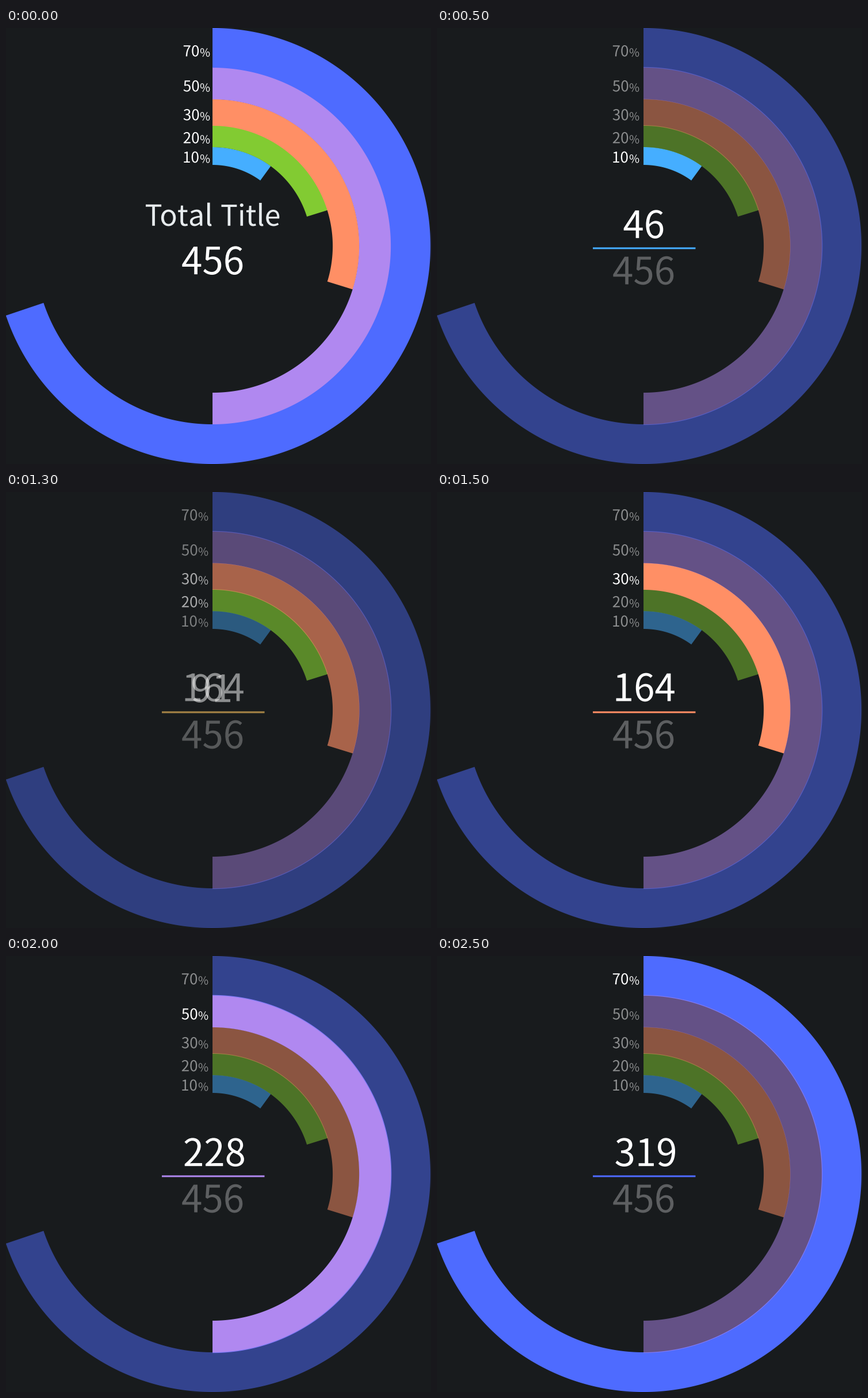
Recreate the animation shown at these times as a matplotlib script. Size 739 by 758 pixels, loop 2.7 s.

```python
import numpy as np
import matplotlib.pyplot as plt
from matplotlib.animation import FuncAnimation
from matplotlib.patches import PathPatch, Polygon, Rectangle
from matplotlib.textpath import TextPath
from matplotlib.transforms import Affine2D

W, H, DPI = 739, 758, 64
CX, CY = 359.1, 379
BG = "#181b1d"
FONT = {"family": "Noto Sans CJK JP"}
DIM = 0.5

# label, count, colour, inner radius, outer radius, sweep in degrees, label baseline
RINGS = [
    ("10", "46", "#45aeff", 141, 172, 36.1, 234),
    ("20", "91", "#82cb32", 171.8, 210, 72.7, 200.3),
    ("30", "164", "#ff8f65", 209, 255.4, 107.2, 160.3),
    ("50", "228", "#b088f0", 255, 311.2, 180, 110.3),
    ("70", "319", "#4e6bff", 310, 379, 251.4, 49.3),
]

fig = plt.figure(figsize=(W / DPI, H / DPI), dpi=DPI, facecolor=BG)
ax = fig.add_axes([0, 0, 1, 1])
ax.set_xlim(0, W)
ax.set_ylim(H, 0)
ax.axis("off")


class Scene:
    """A stack of shapes that fades as separate translucent layers."""

    def __init__(self, level):
        self.level = level
        self.parts = []

    def add(self, patch, alpha):
        patch.set_zorder(self.level * 100 + len(self.parts))
        patch.set_snap(False)
        ax.add_patch(patch)
        self.parts.append((patch, alpha))

    def text(self, s, size, x, y, align="center", color="white", alpha=1.0):
        path = TextPath((0, 0), s, size=size, prop=FONT)
        box = path.get_extents()
        anchor = {"left": box.x0, "right": box.x1,
                  "center": (box.x0 + box.x1) / 2}[align]
        place = Affine2D().translate(-anchor, 0).scale(1, -1).translate(x, y)
        self.add(PathPatch(path.transformed(place), fc=color, lw=0), alpha)

    def ring(self, color, inner, outer, sweep, alpha):
        a = np.radians(np.linspace(0, sweep, 400))
        arc = np.column_stack([np.sin(a), -np.cos(a)])
        points = np.vstack([outer * arc, inner * arc[::-1]]) + (CX, CY)
        self.add(Polygon(points, closed=True, fc=color, lw=0), alpha)

    def chart(self, active=None, shift=0):
        order = list(range(len(RINGS)))
        if active == order[-1]:
            order.insert(0, order.pop())
        for i in order:
            label, _, color, inner, outer, sweep, base = RINGS[i]
            alpha = 1 if active in (None, i) else DIM
            self.ring(color, inner, outer, sweep, alpha)
            self.text(label, 26, 322 + shift, base, alpha=alpha)
            self.text("%", 19.5, 354.3 + shift, base + 0.4, "right", alpha=alpha)

    def show(self, opacity):
        for patch, alpha in self.parts:
            patch.set_visible(opacity > 0)
            patch.set_alpha(alpha * opacity)


def overview():
    scene = Scene(0)
    scene.chart()
    title = "#e7ecee"
    scene.text("T", 50.5, 243, 343.8, "left", title)
    scene.text("otal", 50.5, 357.5, 343.8, "right", title)
    scene.text("Title", 50, 475.3, 343.8, "right", title)
    scene.text("456", 65.5, 358.8, 428.2)
    return scene


def detail(active):
    scene = Scene(active + 1)
    scene.chart(active, shift=-3)
    count, color = RINGS[active][1:3]
    x = {"46": 359, "91": 357.2}.get(count, 362.2)
    y = 363.5 if count == "164" else 365.2
    scene.text(count, 65.5, x, y)
    scene.add(Rectangle((271, 381.4), 178.5, 3, fc=color, lw=0), 1)
    scene.text("456", 65.5, 358.8, 445.6, alpha=0.3)
    return scene


scenes = [overview()] + [detail(i) for i in range(len(RINGS))]


def entered(k, frame):
    """How far scene k has faded in: four steps, then a hold."""
    return min(max((frame - 5 * k + 4) / 4, 0), 1)


def draw(frame):
    for k, scene in enumerate(scenes):
        scene.show(entered(k, frame) * (1 - entered(k + 1, frame)))
    return [patch for scene in scenes for patch, _ in scene.parts]


anim = FuncAnimation(fig, draw, frames=27, interval=100, repeat=True,
                     repeat_delay=0, blit=False)
plt.show()
```
